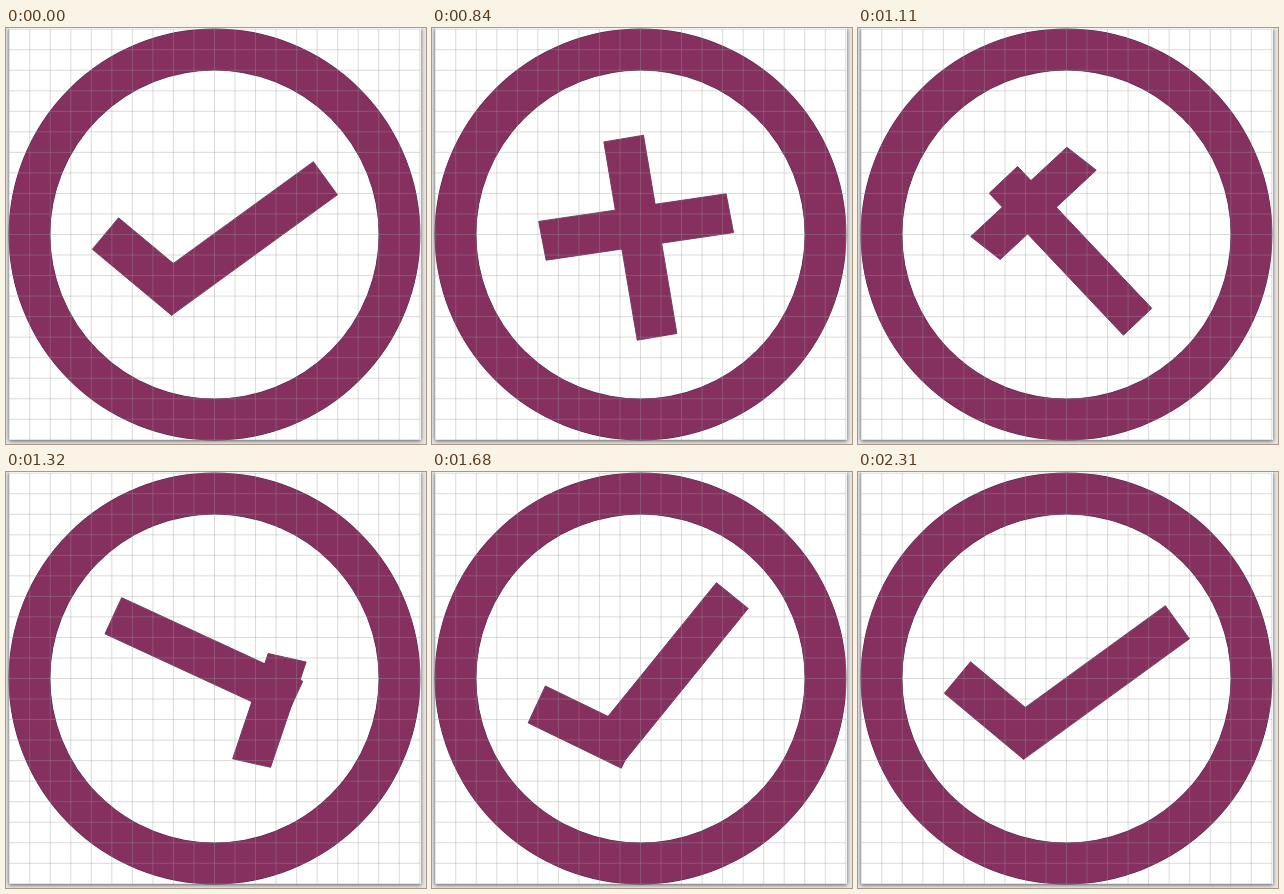
These frames come from a looping animation (420 px wide and 416 px high, 2490 ms). An HTML page:

```html
<!DOCTYPE html>
<html lang="en">
<head>
<meta charset="utf-8">
<title>Plus to check</title>
<style>
html, body { margin: 0; width: 100%; height: 100%; overflow: hidden; background: #e6e6e6; }
#sheet { position: absolute; left: 2.5px; top: 0; width: 412px; height: 412px; background: #fff; box-shadow: 0 1px 4px #0009; }
svg { position: absolute; left: 0; top: 0; }
</style>
</head>
<body>
<div id="sheet"></div>
<svg width="420" height="416" viewBox="0 0 420 416" fill="none">
  <g transform="translate(208.5 206.5)">
    <circle r="185" stroke="#4a2a45" stroke-width="41.8"/>
    <circle r="185" stroke="#86305f" stroke-width="41"/>
    <path id="icon" fill="#86305f" stroke="#4a2a45" stroke-width=".8" paint-order="stroke"/>
    <path id="grid" stroke="#999" stroke-opacity=".35"/>
  </g>
</svg>
<script>
const LOOP = 2490, CUT = 30, START = 592, LENGTH = 1330, TURN_BACK = 0.4;
const icon = document.getElementById("icon");

let lines = "";
for (let i = -10; i <= 10; i++) {
  const p = i * 20.53;
  lines += `M${p} -205.5V205.5M-205.5 ${p}H205.5`;
}
document.getElementById("grid").setAttribute("d", lines);

// Easing through the control points (x1, y1) and (x2, y2)
function bezier(x1, y1, x2, y2) {
  const at = (a, b, s) => 3 * (1 - s) ** 2 * s * a + 3 * (1 - s) * s * s * b + s ** 3;
  return x => {
    let lo = 0, hi = 1;
    for (let i = 0; i < 30; i++) {
      const mid = (lo + hi) / 2;
      if (at(x1, x2, mid) < x) lo = mid; else hi = mid;
    }
    return at(y1, y2, lo);
  };
}
const morph = bezier(0.4, 0, 0.2, 1);
const easeIn = bezier(0.5, 0, 1, 1);
const easeOut = bezier(0, 0, 0.2, 1);

// Corners of a bar, turned clockwise by deg
function bar(x, y, w, h, deg) {
  const a = deg * Math.PI / 180, c = Math.cos(a), s = Math.sin(a);
  return [[-1, -1], [1, -1], [1, 1], [-1, 1]].map(([i, j]) => {
    const u = i * w / 2, v = j * h / 2;
    return [x + u * c - v * s, y + u * s + v * c];
  });
}
const bars = [
  [bar(0, 0, 41, 205, 0), bar(-4, 28, 41, 205, -36)],
  [bar(0, 0, 205, 41, 0), bar(-32, -69.5, 103, 41, -50.2)]
];

// A small swing back, then three quarters of a turn clockwise
function angle(x) {
  return x < TURN_BACK
    ? -23 * easeIn(x / TURN_BACK)
    : -23 + 293 * easeOut((x - TURN_BACK) / (1 - TURN_BACK));
}

function draw(now) {
  const t = now % LOOP;
  const x = t < CUT ? 1 : Math.min(1, Math.max(0, (t - START) / LENGTH));
  const p = morph(x);
  const d = bars.map(([from, to]) =>
    "M" + from.map((a, i) => a.map((v, k) => v + (to[i][k] - v) * p)).join("L") + "Z");
  icon.setAttribute("d", d.join(""));
  icon.setAttribute("transform", `rotate(${angle(x)})`);
  requestAnimationFrame(draw);
}
draw(performance.now());
</script>
</body>
</html>
```
